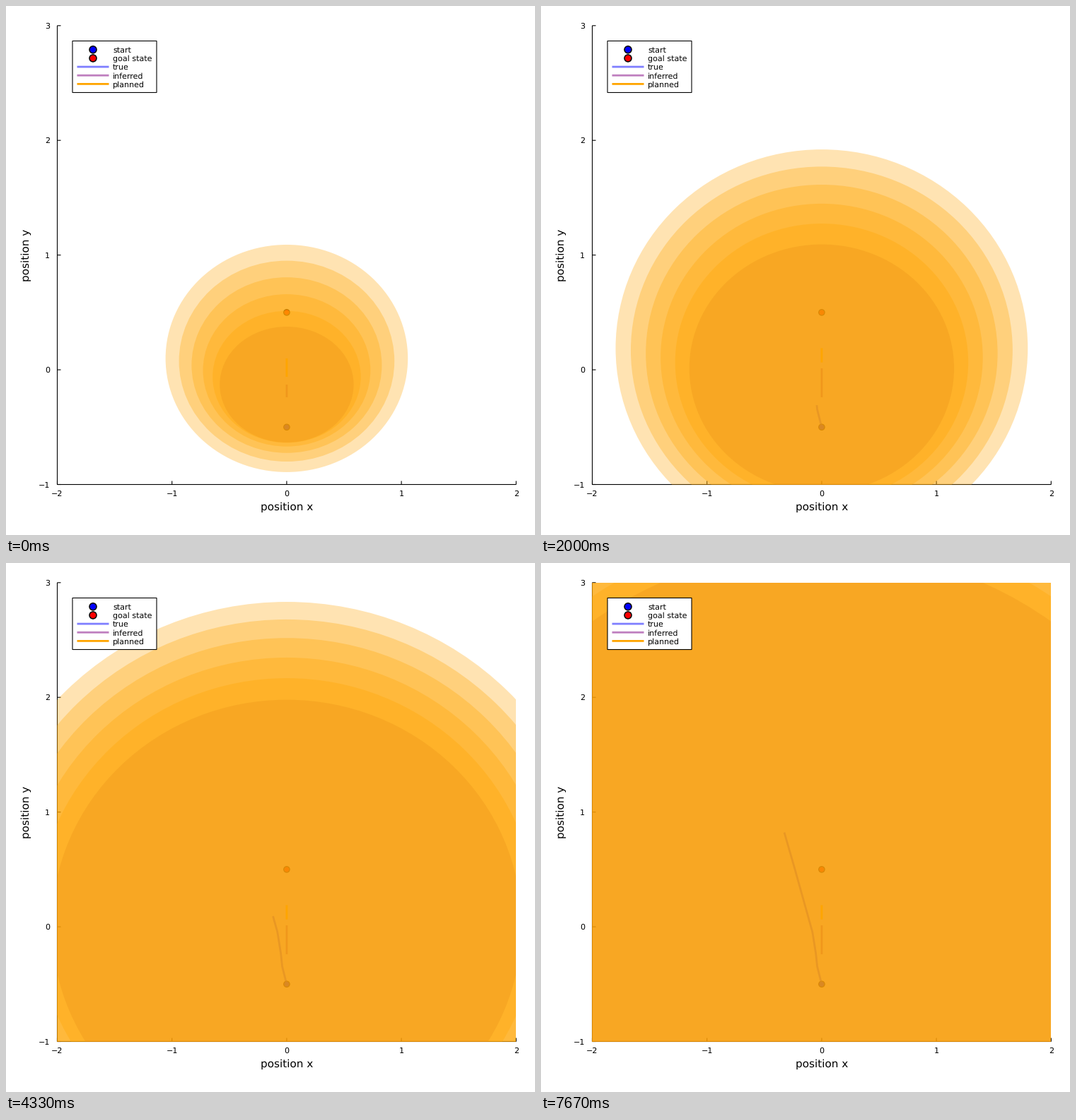
Write a matplotlib script that moves like this. It is 748x749 px and loops after 8000 ms.

```python
import numpy as np
import matplotlib.pyplot as plt
from matplotlib.animation import FuncAnimation
from matplotlib.patches import Circle, Ellipse, Rectangle

plt.rcParams["path.snap"] = False
plt.rcParams["text.hinting"] = "none"

W, H, DPI = 748, 749, 100
TICK_MS, LOOP_MS, STEPS = 40, 8000, 24
LEFT, RIGHT, TOP, BOTTOM = 72.5, 721.3, 27.8, 677.5
UNIT_X, UNIT_Y = (RIGHT - LEFT) / 4, (BOTTOM - TOP) / 4
MID_X = LEFT + 2 * UNIT_X
PX = 72 / DPI

HORIZON = np.arange(6)  # 0 is the inferred state, 1 to 5 are planned
INFERRED_START = 554
PATH_KEYS = [(0, 396.9, 596.4), (5, 390.6, 571.5), (8, 388.6, 552.5),
             (11, 383.8, 522.5), (19, 358.7, 432.5), (23, 344, 381.5)]

fig = plt.figure(figsize=(W / DPI, H / DPI), dpi=DPI, facecolor="white")
ax = fig.add_axes([0, 0, 1, 1])
ax.set_xlim(0, W)
ax.set_ylim(H, 0)
ax.axis("off")


def px(x):
    return LEFT + (x + 2) * UNIT_X


def py(y):
    return BOTTOM - (y + 1) * UNIT_Y


def line(xs, ys, color="black", width=1.1, z=1, alpha=1):
    return ax.plot(xs, ys, color=color, lw=width * PX, alpha=alpha, zorder=z,
                   solid_capstyle="butt", solid_joinstyle="round")[0]


def label(x, y, text, size=8, ha="center", z=1, rotation=0):
    ax.text(x, y, text, fontsize=size, family="DejaVu Sans", color="black", ha=ha,
            va="baseline", rotation=rotation, rotation_mode="anchor", zorder=z)


def marker(x, y, color, radius, stroke, z):
    ax.add_patch(Circle((x, y), radius, fc=color, ec="black", lw=stroke * PX, zorder=z))


def draw_axes():
    line([LEFT, LEFT], [TOP, BOTTOM])
    line([LEFT, RIGHT], [BOTTOM, BOTTOM])
    for v in range(-2, 3):
        line([px(v)] * 2, [BOTTOM, BOTTOM - 5])
        label(px(v), 693.6, str(v).replace("-", "\u2212"))
    for v in range(-1, 4):
        line([LEFT, LEFT + 5], [py(v)] * 2)
        label(62.3, py(v) + 4.1, str(v).replace("-", "\u2212"), ha="right")
    label(MID_X, 713.8, "position x", 11)
    label(33, (TOP + BOTTOM) / 2, "position y", 11, rotation=90)


def draw_legend():
    ax.add_patch(Rectangle((94, 49.5), 119, 73, fc="white", ec="black",
                           lw=1.1 * PX, zorder=10))
    entries = [("start", "blue", 0), ("goal state", "red", 0), ("true", "blue", 0.5),
               ("inferred", "purple", 0.5), ("planned", "orange", 1)]
    for i, (name, color, alpha) in enumerate(entries):
        y = 61.8 + 12.15 * i
        if alpha:
            line([100.5, 145.5], [y, y], color, 2.8, 11, alpha)
        else:
            marker(123, y, color, 5, 1.5, 11)
        label(151, y + 4.1, name, ha="left", z=11)


def belief(n):
    """Centre heights and semi-axes of all ellipses after n steps."""
    k = HORIZON
    drop, rise = (0, 1) if n else (23, 1.3)
    centers = 513 + drop - rise * (9.1 * k - 0.68 * k**2)
    var_x = 8968 + 1490 * k + 517 * k**2 + (1388 + 983 * k) * n + 493 * n**2
    var_y = 6724 + 1518 * k + 464 * k**2 + (1168 + 973 * k) * n + 474 * n**2
    return centers, np.sqrt(var_x), np.sqrt(var_y)


draw_axes()
draw_legend()
marker(MID_X, py(-0.5), "blue", 4.2, 1.2, 2)
marker(MID_X, py(0.5), "red", 4.2, 1.2, 2)

true_line = line([], [], "blue", 2.8, 3, 0.5)
inferred_line = line([], [], "purple", 2.8, 4, 0.5)
planned_line = line([], [], "orange", 2.8, 6)

plot_area = Rectangle((LEFT, TOP), RIGHT - LEFT, BOTTOM - TOP, transform=ax.transData)
ellipses = []
for k in HORIZON:
    color, alpha, z = ("orange", 0.3, 7) if k else ("purple", 0.27, 5)
    ellipse = Ellipse((MID_X, 0), 1, 1, fc=color, ec="none", lw=0, alpha=alpha, zorder=z)
    ax.add_patch(ellipse)
    ellipse.set_clip_path(plot_area)
    ellipses.append(ellipse)


def update(tick):
    # Steps last a third of a second; the offset rounds them onto the tick grid.
    n = int((tick * TICK_MS + 30) * STEPS / LOOP_MS)
    centers, semi_x, semi_y = belief(n)
    for ellipse, cy, a, b in zip(ellipses, centers, semi_x, semi_y):
        ellipse.set_center((MID_X, cy))
        ellipse.set_width(2 * a)
        ellipse.set_height(2 * b)
    key_n, key_x, key_y = zip(*PATH_KEYS)
    steps = np.arange(n + 1)
    true_line.set_data(np.interp(steps, key_n, key_x), np.interp(steps, key_n, key_y))
    inferred_line.set_data([MID_X, MID_X], [INFERRED_START, centers[0]])
    planned_line.set_data([MID_X, MID_X], [centers[1], centers[-1]])
    return [*ellipses, true_line, inferred_line, planned_line]


anim = FuncAnimation(fig, update, frames=LOOP_MS // TICK_MS, interval=TICK_MS,
                     repeat=True, repeat_delay=0, blit=False)
plt.show()
```
